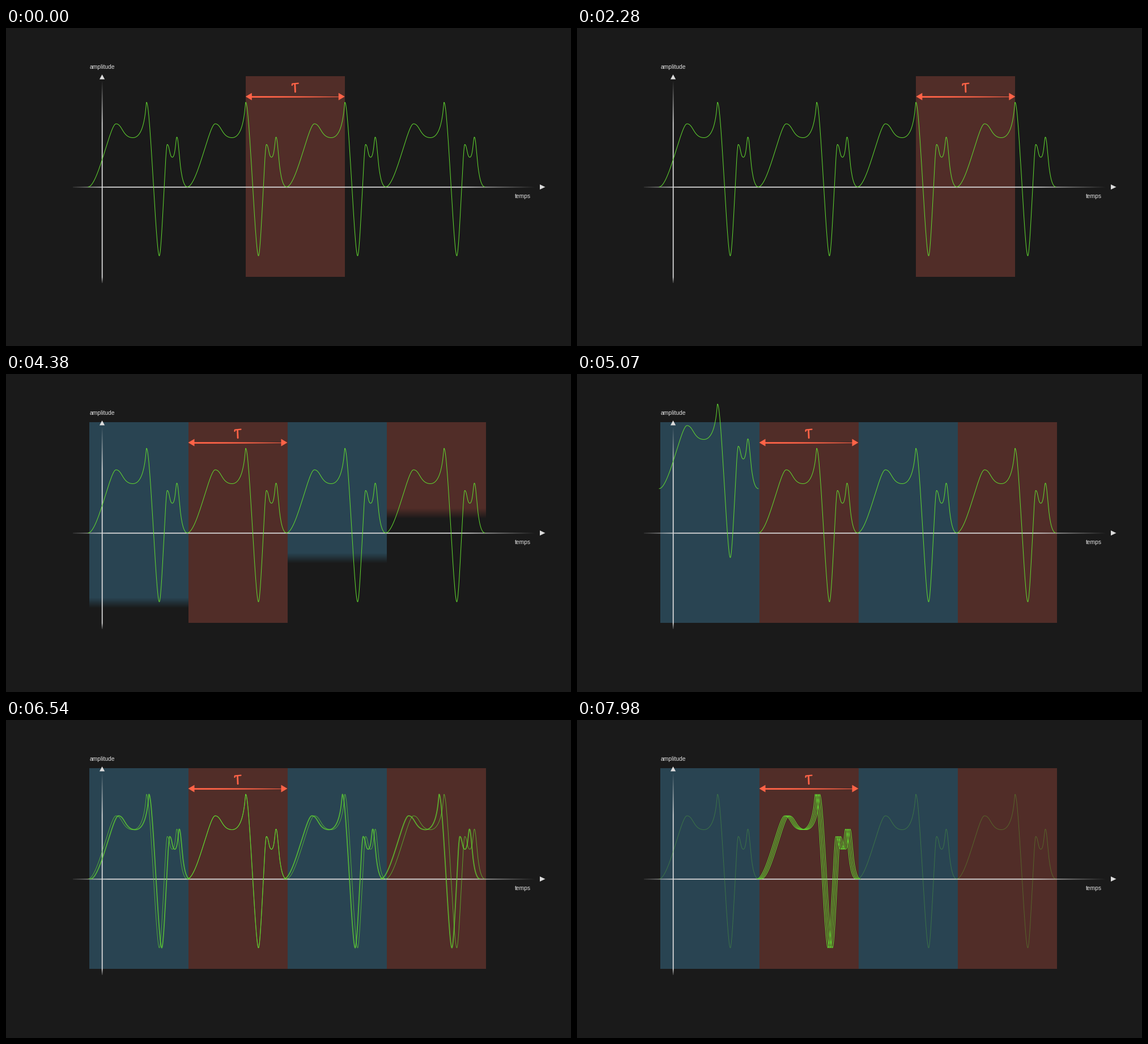
A matplotlib script that plays this animation: 997 px wide and 561 px high, repeating every 8000 ms.

```python
import numpy as np
import matplotlib.pyplot as plt
from matplotlib.animation import FuncAnimation
from matplotlib.colors import to_rgb
from matplotlib.patches import Polygon, Rectangle
from matplotlib.transforms import Affine2D

W, H, DPI = 997, 561, 64
FRAMES, INTERVAL = 320, 25
TICK = 30                      # the picture changes every 30 ms
PX = 72 / DPI
BG, WHITE, GREEN, CORAL = "#1a1a1a", "#dcdcdc", "#62da30", "#ff6347"
BLUE, RED = "#294452", "#512d28"
TOP, BOTTOM, PERIOD = 85, 439, 175
FLOOR, AXIS_X, AXIS_Y = 402, 169.6, 280.5

fig = plt.figure(figsize=(W / DPI, H / DPI), dpi=DPI, facecolor=BG)
ax = fig.add_axes([0, 0, 1, 1])
ax.axis("off")


def stroke(x, y, color, width, z, **kw):
    return ax.plot(x, y, color=color, lw=width * PX, zorder=z,
                   solid_capstyle="round", solid_joinstyle="round", **kw)[0]


def arrowhead(x, y, dx, dy, length, half, color, z, **kw):
    """Triangle with its tip at (x, y), pointing along (dx, dy)."""
    bx, by = x - dx * length, y - dy * length
    pts = [(x, y), (bx - dy * half, by + dx * half),
           (bx + dy * half, by - dx * half)]
    ax.add_patch(Polygon(pts, fc=color, lw=0, zorder=z, **kw))


def strip(rgba, x0, x1, y0, y1, z):
    return ax.imshow(rgba, extent=(x0, x1, y1, y0), aspect="auto",
                     interpolation="nearest", zorder=z)


def tint(color, alpha):
    rgba = np.empty(alpha.shape + (4,))
    rgba[..., :3] = to_rgb(color)
    rgba[..., 3] = alpha
    return rgba


def ramp(v, start, length):
    return np.clip((v - start) / length, 0, 1)


def sine_ease(t, start, length):
    return (1 - np.cos(np.pi * ramp(t, start, length))) / 2


# Extrema of one period: x, y, and where the next swing leans (0 left, 1 right)
KNOTS = [(145, 280.3, 0.57), (194, 169, 0.38), (224, 193.5, 0.94),
         (248, 131, 0.52), (270.5, FLOOR, 0.54), (284.5, 205.5, 0.44),
         (293.5, 228, 0.72), (301.5, 192.5, 0.23), (320, 280.3, 0)]


def waveform():
    """Join the extrema by curves that are level at both ends."""
    u = np.linspace(0, 1, 28)
    xs, ys = [], []
    for (x0, y0, lean), (x1, y1, _) in zip(KNOTS, KNOTS[1:]):
        spread = 0.22 if abs(y1 - y0) > 100 else 0
        run = (3 * u * (1 - u) ** 2 * (lean - spread)
               + 3 * u * u * (1 - u) * (lean + spread) + u ** 3)
        xs.append(x0 + (x1 - x0) * run)
        ys.append(y0 + (y1 - y0) * u * u * (3 - 2 * u))
    return np.concatenate(xs), np.concatenate(ys)


WX, WY = waveform()
MID = (WX[0] + WX[-1]) / 2

# ---- axes: brushed lines that fade out towards the arrowheads
BRUSH = np.array([0.15, 1, 0.6])
xs = np.arange(118, 934)
strip(tint(WHITE, np.outer(BRUSH, ramp(xs, 110, 70) * ramp(-xs, -934, 130))),
      118, 934, 279, 282, 4)
ys = np.arange(95, 450)
strip(tint(WHITE, np.outer(ramp(ys, 92, 75) * ramp(-ys, -451, 12), BRUSH)),
      168, 171, 95, 450, 4)
arrowhead(AXIS_X, 82, 0, -1, 8.5, 4.6, WHITE, 4)
arrowhead(951.5, AXIS_Y, 1, 0, 9.5, 4.5, WHITE, 4)
for word, x, y in (("amplitude", AXIS_X, 71.5), ("temps", 912, 300)):
    ax.text(x, y, word, color=WHITE, fontsize=10.2 * PX, ha="center",
            va="baseline", family="Liberation Sans", zorder=6)

# ---- coloured panels, revealed from the top with a soft edge
ROWS = np.arange(TOP, BOTTOM) + 0.5
SOFT, WIPE_SPEED = 18, 0.415
panels = []
for n, (slot, color) in enumerate([(0, BLUE), (2, BLUE), (3, RED)]):
    x = 147 + slot * PERIOD
    img = strip(tint(color, np.zeros((len(ROWS), 1))), x, x + PERIOD - 0.3,
                TOP, BOTTOM, 2)
    panels.append((img, color, 3590 + 190 * n))

ax.set_xlim(0, W)
ax.set_ylim(H, 0)

# ---- sliding period marker, built at x = 0
slide = Affine2D()
moved = slide + ax.transData
ax.add_patch(Rectangle((0, TOP), PERIOD, BOTTOM - TOP, fc=RED, lw=0,
                       zorder=2, transform=moved))
for tip, way in ((0, -1), (PERIOD, 1)):
    arrowhead(tip, 121, way, 0, 11, 6.5, CORAL, 7, transform=moved)
u = np.linspace(0, 1, 20)
half = 1.4 - u ** 2
ax.fill_between(9 + u * (PERIOD - 18), 121 - half, 121 + half, color=CORAL,
                lw=0, zorder=7, transform=moved)
stroke([82, 82.4, 93], [101, 98.6, 97.6], CORAL, 2.3, 7, transform=moved)
stroke([87, 87.6], [98.5, 112.8], CORAL, 2.8, 7, transform=moved)

ghosts = [stroke(WX + k * PERIOD, WY, GREEN, 0.95, 5) for k in range(4)]
waves = [stroke(WX, WY, GREEN, 1, 6) for k in range(4)]

HOP, STAGGER, GATHER = 4890, 180, 6330
RISE, LAND, SETTLE = 210, 610, 865


def marker_x(t):
    return (422.8 + 224.7 * sine_ease(t, 35, 1728)
            - 326 * sine_ease(t, 1847, 1705))


def hop(t):
    """Height and squash of one piece, t ms after its take-off."""
    if 0 < t < LAND:
        span = RISE if t < RISE else LAND - RISE
        return 85 * (1 - ((t - RISE) / span) ** 2), 0
    if LAND <= t < SETTLE:
        return 0, 0.11 * np.sin(np.pi * (t - LAND) / (SETTLE - LAND))
    return 0, 0


def update(i):
    t = (i * INTERVAL + INTERVAL // 2) // TICK * TICK
    slide.clear().translate(marker_x(t), 0)

    for img, color, start in panels:
        head = TOP + (t - start) * WIPE_SPEED
        img.set_visible(t > start)
        img.set_data(tint(color, ramp(head - ROWS, 0, SOFT)[:, None]))

    fade = 1 - 0.67 * ramp(t, GATHER, 400)
    gap = PERIOD * (1 - sine_ease(t, GATHER, 1790))
    for k, (ghost, wave) in enumerate(zip(ghosts, waves)):
        ghost.set_visible(t >= GATHER)
        ghost.set_alpha(fade)
        up, squash = hop(t - HOP - k * STAGGER)
        wave.set_data(MID + (WX - MID) * (1 + squash) + PERIOD + (k - 1) * gap,
                      FLOOR + (WY - FLOOR) * (1 - squash) - up)
        # pieces in motion look a little softer and wider
        blur = min(1, squash / 0.03)
        if t > GATHER and k != 1:
            blur = min(1, gap / 60)
        wave.set_linewidth((1 + 0.8 * blur) * PX)
        wave.set_alpha(1 - 0.27 * blur)
    return waves + ghosts


anim = FuncAnimation(fig, update, frames=FRAMES, interval=INTERVAL,
                     init_func=lambda: update(0), repeat=True, repeat_delay=0,
                     blit=False)
plt.show()
```
